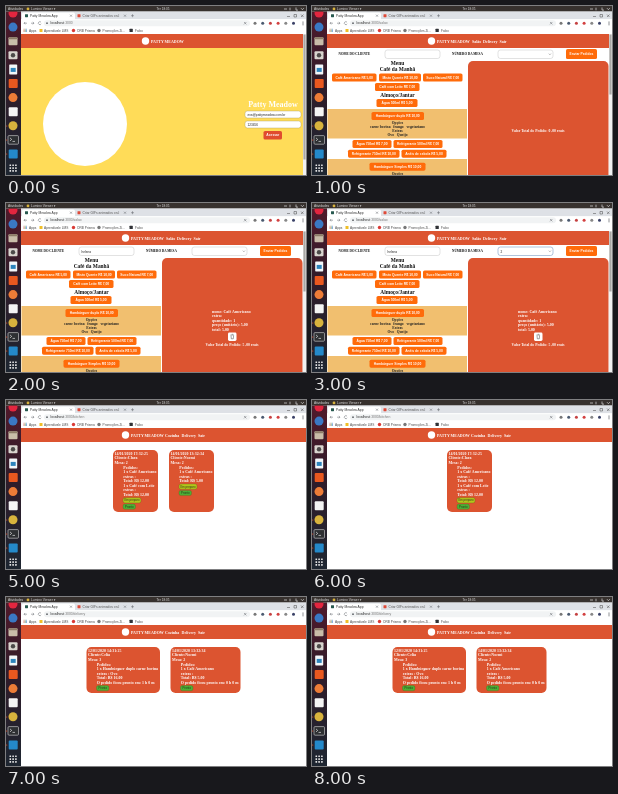
Write an HTML page that moves like this. It is 300 px wide and 169 px high and loops after 9000 ms.

```html
<!DOCTYPE html>
<html lang="pt-BR">
<head>
<meta charset="utf-8">
<style>
html, body { margin: 0; width: 100%; height: 100%; overflow: hidden; background: #fff; }
svg { display: block; width: 100vw; height: 100vh; }
text { font-family: "Liberation Sans", Arial, sans-serif; white-space: pre; }
.serif { font-family: "Liberation Serif", Times, serif; font-weight: bold; }
.bold { font-weight: bold; }
</style>
</head>
<body>
<svg viewBox="0 0 300 169" preserveAspectRatio="none">
  <defs>
    <linearGradient id="dock" x1="0" y1="0" x2="0" y2="1">
      <stop offset="0" stop-color="#511a2b"/>
      <stop offset=".45" stop-color="#2f1c2a"/>
      <stop offset="1" stop-color="#1e2631"/>
    </linearGradient>
  </defs>
  <g id="page"></g>
  <g id="desktop"></g>
</svg>
<script>
const RED = '#dc5430', ORANGE = '#ff6b0a', YELLOW = '#ffdc58', PEACH = '#f1bf6f';
const BRAND = 'Patty Meadow';

const rect = (x, y, w, h, fill, r = 0, extra = '') =>
  `<rect x="${x}" y="${y}" width="${w}" height="${h}" rx="${r}" fill="${fill}" ${extra}/>`;
const circle = (x, y, r, fill) => `<circle cx="${x}" cy="${y}" r="${r}" fill="${fill}"/>`;
const path = (d, stroke, width = .6) =>
  `<path d="${d}" fill="none" stroke="${stroke}" stroke-width="${width}"/>`;
const text = (x, y, str, size, fill, cls = '', anchor = 'start') =>
  `<text x="${x}" y="${y}" font-size="${size}" fill="${fill}" class="${cls}" text-anchor="${anchor}">${str}</text>`;
const serif = (x, y, str, size, fill = '#111', anchor = 'start') =>
  text(x, y, str, size, fill, 'serif', anchor);
const button = (x, y, w, label, h = 8, fill = ORANGE) =>
  rect(x, y, w, h, fill, 1.6) + text(x + w / 2, y + h / 2 + 1.2, label, 3.3, '#fff', 'bold', 'middle');
const field = (x, y, w, h, border, width = .4) =>
  rect(x, y, w, h, '#fff', 2.4, `stroke="${border}" stroke-width="${width}"`);
const scrollbar = thumb => rect(297, 28, 3, 141, '#f1f1f1') + rect(297.4, 28.5, 2.2, thumb, '#a9a7a5');

function dock() {
  const square = fill => y => rect(2.7, y - 4.5, 9, 9, fill, 1);
  const disc = fill => y => circle(7, y, 4.5, fill);
  const icons = [
    disc('#e3263f'),
    disc('#3a78c4'),
    y => rect(2.5, y - 4, 9, 8, '#c9bda9', 1) + rect(2.5, y - 4, 9, 2, '#8d7c68', 1),
    y => rect(2.5, y - 4, 9, 8, '#d9d5cf', 1) + circle(7, y, 2.2, '#4c4a49'),
    y => rect(3.2, y - 5, 8, 10, '#f3f7fa', .7) + rect(4.7, y - 1.5, 5, 4, '#2d84bd'),
    square('#e9581f'),
    disc('#ed7c37'),
    square('#f4f4f4'),
    disc('#d8b33d'),
    y => rect(2, y - 4.3, 10.5, 8.6, '#2e3033', 1, 'stroke="#d5d5d5" stroke-width=".6"')
      + path(`M4 ${y - 2}l1.7 1.5-1.7 1.5M6.5 ${y + 1.5}h2.5`, '#fff'),
    square('#2489ca')
  ];
  let out = rect(0, 5.5, 15, 163.5, 'url(#dock)');
  icons.forEach((icon, i) => out += icon(7 + i * 14.1));
  for (let i = 0; i < 9; i++) out += rect(3.5 + i % 3 * 2.8, 158.5 + (i / 3 | 0) * 2.8, 1.6, 1.6, '#e8e8e8', .3);
  for (const y of [120, 134, 148]) out += circle(.7, y, .6, '#e95420');
  return out;
}

function browser(url) {
  const gray = '#5f6368';
  let out = rect(0, 0, 300, 5.6, '#37312e');
  out += text(2, 4, 'Atividades', 3.3, '#ddd') + circle(22, 2.9, 1.4, '#d8b33d');
  out += text(25, 4, 'Lumino Viewer ▾', 3.3, '#ddd') + text(157, 4, 'Ter 18:05', 3.1, '#ddd', '', 'middle');
  out += path('M278 3h3M284 1.7v2.6M290 1.5v2.6h2M295 2.2l1.4 1.5 1.4-1.5', '#ddd', .7);
  out += rect(15, 5.5, 285, 8, '#dee1e6') + rect(16, 6.5, 53, 8, '#fff', 1.8);
  out += rect(19, 8.2, 3, 3, '#27594f', .4) + text(24, 11, `${BRAND} App`, 3.3, '#333');
  out += path('M64 8.7l2 2m0-2l-2 2M118 8.7l2 2m0-2l-2 2M125 9.7h3M126.5 8.2v3', gray, .5);
  out += rect(71.5, 8.2, 3, 3, '#df4a38', .4) + text(76.5, 11, 'Criar GIFs animados on-l', 3.3, '#555');
  out += path('M281 10.5h3M288 8.5h2.5v2.5h-2.5zM295 8.5l2.5 2.5m0-2.5l-2.5 2.5', '#444', .5);
  out += rect(15, 13.2, 285, 14.8, '#fff') + rect(38, 14.2, 206, 6, '#f1f3f4', 3);
  out += path('M21 17.2h-3m1.2-1.2l-1.2 1.2 1.2 1.2M25 17.2h3m-1.2-1.2l1.2 1.2-1.2 1.2M35 16.2a1.5 1.5 0 1 0 .2 1.6', gray, .5);
  out += circle(41, 17.2, .9, gray) + text(44.5, 18.4, 'localhost', 3.4, '#222') + text(58.2, 18.4, url, 3.4, '#777');
  out += path('M238 16l2.4 2.4m0-2.4l-2.4 2.4', gray, .5);
  ['#777', '#4b5a70', '#c54141', '#d34040', '#888', '#3b4268'].forEach((c, i) => out += circle(249 + i * 7.7, 17.2, 1.5, c));
  out += path('M297 15.4v4', gray, .7);
  for (let i = 0; i < 9; i++) out += rect(17.6 + i % 3 * 1.2, 22.8 + (i / 3 | 0) * 1.2, .8, .8, ['#d85040', '#53975d', '#4c83d4'][i % 3]);
  [['Apps', 23], ['Aprendivale LMS', 38], ['ORB Prisma', 71], ['Promoções Zi…', 96.5], ['Falox', 129]]
    .forEach(([label, x]) => out += text(x, 25.6, label, 3.2, '#444'));
  out += rect(33.5, 23, 3, 3, '#f0bf28') + circle(67.5, 24.5, 1.7, '#d93b36') + circle(93, 24.5, 1.7, '#777');
  return out + rect(123.5, 22.8, 3.3, 3.3, '#303236', .4);
}

function header(links) {
  const x = links.length ? 125 : 145;
  let out = rect(15, 28, 285, 14, RED) + circle(x - 5.5, 35, 3.7, '#fff');
  out += serif(x, 36.6, BRAND.toUpperCase(), 3.95, '#fff');
  links.forEach(([label, lx]) => out += serif(lx, 36.6, label, 4, '#fff'));
  return out;
}

function login() {
  let out = rect(15, 28, 285, 141, YELLOW) + header([]);
  out += circle(79, 118, 42, '#fff') + serif(267, 100.5, BRAND, 8, '#fff', 'middle');
  out += field(239, 105, 56, 7, '#a89a62') + text(241.5, 109.6, 'eva@pattymeadow.com.br', 3.2, '#222');
  out += field(239, 115, 56, 7, '#a89a62') + text(241.5, 119.7, '123456', 3.2, '#222');
  return out + button(257.5, 125, 18.5, 'Acessar', 8.5, '#e04d2f') + scrollbar(125);
}

function hall({ name = '', table = '', item = false }) {
  let out = rect(15, 28, 285, 141, '#fff') + header([['Salão', 160], ['Delivery', 171], ['Sair', 187.5]]);
  out += serif(26.5, 48.6, 'NOME DO CLIENTE', 3.3) + serif(140, 48.6, 'NÚMERO DA MESA', 3.3);
  out += field(73, 44, 55, 8.5, '#b5b5b5') + text(75.5, 49.5, name, 3.2, '#222');
  out += field(186, 44, 55, 8.5, table ? '#7b9cc4' : '#b5b5b5', table ? .6 : .4) + text(188.5, 49.5, table, 3.2, '#222');
  out += path('M236.8 47.6l1.1 1.2 1.1-1.2', '#777', .5) + button(254, 43, 31, 'Enviar Pedidos', 10);

  out += serif(85.5, 58.5, 'Menu', 5.4, '#111', 'middle') + serif(85.5, 65.3, 'Café da Manhã', 5.4, '#111', 'middle');
  out += button(20, 67.5, 44.5, 'Café Americano R$ 5,00') + button(67, 67.5, 42, 'Misto Quente R$ 10,00');
  out += button(111, 67.5, 39.5, 'Suco Natural R$ 7,00') + button(63, 77, 44.5, 'Café com Leite R$ 7,00');
  out += serif(85.5, 90.8, 'Almoço/Jantar', 5.4, '#111', 'middle') + button(64.5, 93, 41, 'Água 500ml R$ 5,00');
  out += rect(15.5, 103, 139.5, 29.5, PEACH) + button(59.5, 106, 52.5, 'Hambúrguer duplo R$ 10,00');
  ['Opções', 'carne bovina   frango   vegetariano', 'Extras', 'Ovo   Queijo']
    .forEach((line, i) => out += serif(85.5, 118 + i * 4, line, 3.7, '#222', 'middle'));
  out += button(40.5, 134, 39, 'Água 750ml R$ 7,00') + button(81.5, 134, 49, 'Refrigerante 500ml R$ 7,00');
  out += button(36, 143.7, 51.5, 'Refrigerante 750ml R$ 10,00') + button(89.5, 143.7, 45, 'Anéis de cebola R$ 5,00');
  out += rect(15.5, 153, 139.5, 16, PEACH) + button(57.5, 156.7, 56, 'Hambúrguer Simples R$ 10,00');
  out += serif(85.5, 168.5, 'Opções', 3.7, '#222', 'middle');

  out += scrollbar(60) + rect(156, 55, 140.5, 122, RED, 5);
  if (!item) return out + serif(226, 126, 'Valor Total do Pedido: 0 ,00 reais', 3.75, '#fff', 'middle');
  ['nome: Café Americano', 'extra:', 'quantidade: 1', 'preço (unitário): 5,00', 'total: 5,00']
    .forEach((line, i) => out += serif(206, 109.7 + i * 4.55, line, 3.95, '#fff'));
  out += rect(222, 129.5, 8.5, 8.5, '#fff', 1.4) + path('M224.5 132h3.5M225 132.5l.3 3.3h2l.3-3.3M225.8 131.3h1', '#444', .5);
  return out + serif(226, 142.5, 'Valor Total do Pedido: 5 ,00 reais', 3.75, '#fff', 'middle');
}

// Item lines are indented below the first three lines of a card.
function card(x, w, h, lines, chips) {
  let out = rect(x, 50, w, h, RED, 5);
  lines.forEach((line, i) => out += serif(x + (i < 3 ? 1.5 : 10.3), 54.8 + i * 4.57, line, 3.95, '#fff'));
  chips.forEach(([label, width, color], i) => {
    const y = 52 + lines.length * 4.57 + i * 6.4;
    out += rect(x + 10, y, width, 5.2, color, 1.8, 'stroke="#555f18" stroke-width=".3"');
    out += text(x + 10 + width / 2, y + 3.6, label, 2.9, '#293019', '', 'middle');
  });
  return out;
}

const prepare = ['Em preparo', 18, '#b4c51b'], ready = ['Pronto', 12.5, '#4caf36'];
const order = (item, total) => [item, 'extras :', `Total: R$ ${total}`];
const clara = x => card(x, 45, 62, ['14/01/2020 17:32:25', 'Cliente:Clara', 'Mesa: 2', 'Pedidos:',
  ...order('1 x Café Americano', '12,00'), ...order('1 x Café com Leite', '12,00')], [prepare, ready]);
const noemi = ['14/01/2020 13:32:34', 'Cliente:Noemi', 'Mesa: 2', 'Pedidos:', ...order('1 x Café Americano', '5,00')];

function kitchen(both) {
  const cards = both ? clara(107) + card(163, 45, 62, noemi, [prepare, ready]) : clara(135);
  return rect(15, 28, 285, 141, '#fff') + header([['Cozinha', 159], ['Delivery', 175.5], ['Sair', 192]]) + cards;
}

function delivery() {
  const done = time => `O pedido ficou pronto em: ${time}`;
  const celia = ['12/01/2020 14:31:25', 'Cliente:Celia', 'Mesa: 3', 'Pedidos:',
    '1 x Hambúrguer duplo carne bovina', 'extras : Ovo', 'Total: R$ 16,00', done('1 h 0 m')];
  return rect(15, 28, 285, 141, '#fff') + header([['Cozinha', 159], ['Delivery', 175.5], ['Sair', 192]])
    + card(80.5, 73.5, 46, celia, [ready]) + card(164.5, 70, 46, [...noemi, done('0 h 0 m')], [ready]);
}

const scenes = [
  [':3000', login],
  [':3000/salao', () => hall({})],
  [':3000/salao', () => hall({ name: 'helena', item: true })],
  [':3000/salao', () => hall({ name: 'helena', table: '2', item: true })],
  [':3000/kitchen', () => kitchen(true)],
  [':3000/kitchen', () => kitchen(true)],
  [':3000/kitchen', () => kitchen(false)],
  [':3000/delivery', delivery],
  [':3000/delivery', delivery]
];
const page = document.getElementById('page'), desktop = document.getElementById('desktop');
const start = performance.now();
let shown = -1;

function update(now) {
  const index = Math.floor(Math.max(0, now - start) / 1000) % scenes.length;
  if (index !== shown) {
    const [url, draw] = scenes[index];
    page.innerHTML = draw();
    desktop.innerHTML = dock() + browser(url);
    shown = index;
  }
  requestAnimationFrame(update);
}
update(start);
</script>
</body>
</html>
```
